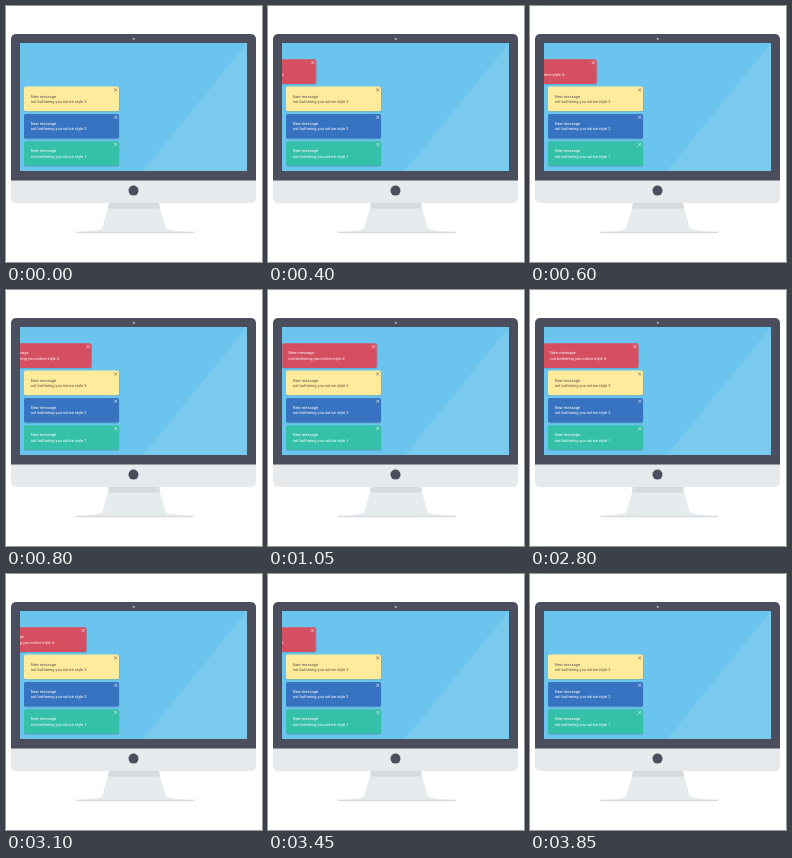
Animation, 256 px wide and 256 px high, one loop 4900 ms. Source, as an HTML page:

```html
<!DOCTYPE html>
<html lang="en">
<head>
<meta charset="utf-8">
<title>Notices on a monitor</title>
<style>
  html, body { margin: 0; width: 100%; height: 100%; overflow: hidden; background: #fff; }
  svg { display: block; width: 100%; height: 100%; }
  text { font: 4px Roboto, Arial, sans-serif; fill: var(--ink); text-rendering: geometricPrecision; }

  .face { fill: var(--face); }
  .shade { fill: #234; opacity: .2; }
  .close { stroke: var(--ink); stroke-width: .7; opacity: .8; fill: none; }
  .red    { --face: #d64f60; --ink: #fff; }
  .yellow { --face: #ffeb9c; --ink: #5c5747; }
  .blue   { --face: #3873c1; --ink: #fff; }
  .teal   { --face: #35c1a8; --ink: #fff; }

  /* 50 ms ticks; the small delay keeps samples clear of the step edges */
  .slider { animation: slide 4900ms -2ms infinite; }
  @keyframes slide {
    0%        { transform: translateX(-102.5px); animation-timing-function: steps(22, end); }
    22.449%   { transform: translateX(.5px);     animation-timing-function: steps(2, end); }
    24.4898%  { transform: translateX(8.5px);    animation-timing-function: steps(2, end); }
    26.5306%  { transform: translateX(0);        animation-timing-function: linear; }
    56.1224%  { transform: translateX(0);        animation-timing-function: steps(22, end); }
    78.5714%, 100% { transform: translateX(-102.5px); }
  }
</style>
</head>
<body>
<svg viewBox="0 0 256 256">
  <defs>
    <clipPath id="screen"><rect x="14" y="37" width="227" height="128"/></clipPath>
    <g id="frame">
      <rect class="shade" x="18" y=".7" width="95.3" height="24.8" rx="1.8"/>
      <rect class="face" x="18" width="95" height="24.6" rx="1.8"/>
      <path class="close" d="M108.1 1.7l3.2 3.2m0-3.2l-3.2 3.2"/>
      <text x="24.8" y="11">New message</text>
    </g>
  </defs>

  <!-- stand -->
  <path d="M68 226q24-.6 28-3.500l6-20 1-6.500h50l1 6.500 6 20q4 2.900 30 3.500z" fill="#e6ebee"/>
  <path d="M103 196h50l1 6.500h-52z" fill="#d5dadd"/>
  <path d="M68 225.700h122l-4 1.500h-114z" fill="#d8dcdf"/>

  <!-- body -->
  <path d="M5 173h245v18.500q0 5.500-5.500 5.500h-234q-5.500 0-5.500-5.500z" fill="#e6eaed"/>
  <path d="M5 174.600v-141.100q0-5.500 5.500-5.500h234q5.500 0 5.500 5.500v141.100z" fill="#4b4f5d"/>
  <circle cx="127.800" cy="32.800" r="1.100" fill="#b4b7c0"/>
  <circle cx="127.500" cy="184.600" r="5" fill="#4b4f5d"/>

  <g clip-path="url(#screen)">
    <rect x="14" y="37" width="227" height="128" fill="#6ac4ed"/>
    <path d="M137 165L241 37v128z" fill="#7acaee"/>

    <g class="slider">
      <g class="red" transform="translate(0 53.300)">
        <use href="#frame"/>
        <text x="24.800" y="16.400">not bothering you notice style 4</text>
      </g>
    </g>
    <g class="yellow" transform="translate(0 80.600)">
      <use href="#frame"/>
      <text x="24.800" y="16.400">not bothering you notice style 3</text>
    </g>
    <g class="blue" transform="translate(0 107.900)">
      <use href="#frame"/>
      <text x="24.800" y="16.400">not bothering you notice style 2</text>
    </g>
    <g class="teal" transform="translate(0 135.200)">
      <use href="#frame"/>
      <text x="24.800" y="16.400">not bothering you notice style 1</text>
    </g>
  </g>
</svg>
</body>
</html>
```
